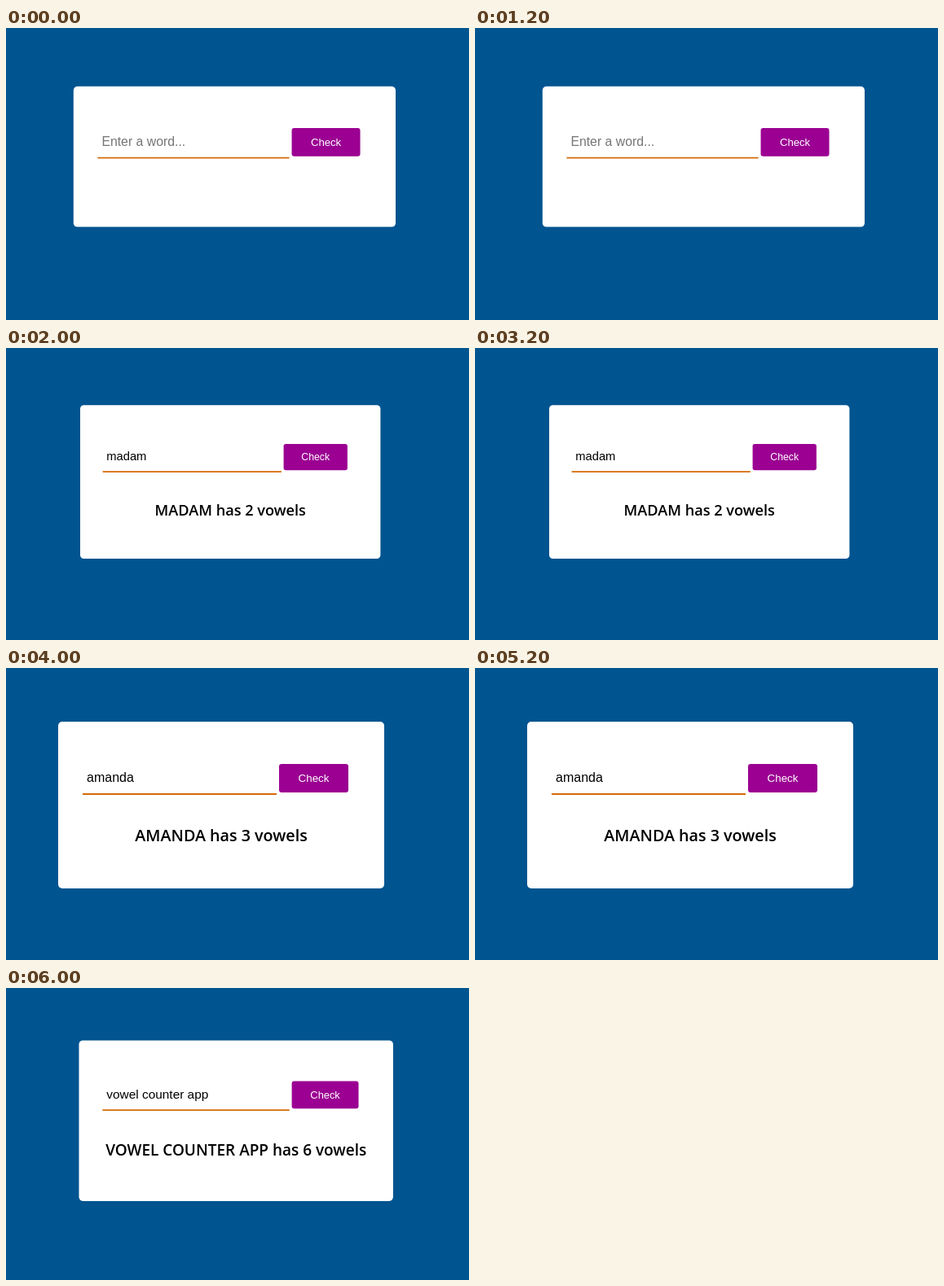
These frames come from a looping animation (568x359 px, 8000 ms). An HTML page with a canvas:

```html
<!DOCTYPE html>
<html lang="en">
<head>
<meta charset="utf-8">
<title>Vowel counter</title>
<style>
  html, body { margin: 0; width: 100%; height: 100%; overflow: hidden; background: #005490; }
  canvas { display: block; width: 568px; height: 359px; }
</style>
</head>
<body>
<canvas id="stage"></canvas>
<script>
const W = 568, H = 359, HOLD = 2000;
const SANS = '"Liberation Sans", Arial, sans-serif';
const OPEN = '"Open Sans", sans-serif';

// Card position and zoom for each step
const scenes = [
  { x: 82.8, y: 71.7, zoom: 0.988, height: 175, word: '' },
  { x: 91, y: 70.2, zoom: 0.921, height: 205, word: 'madam' },
  { x: 64, y: 66, zoom: 1, height: 205, word: 'amanda' },
  { x: 89.5, y: 64.4, zoom: 0.9635, height: 205, word: 'vowel counter app' }
];

const canvas = document.getElementById('stage');
const ctx = canvas.getContext('2d');
const dpr = window.devicePixelRatio || 1;
canvas.width = W * dpr;
canvas.height = H * dpr;

function widthOf(font, str) {
  ctx.font = font;
  return ctx.measureText(str).width;
}

// Use semibold where the medium weight is missing
const hasMedium = widthOf(`500 100px ${OPEN}`, 'vowels') !== widthOf(`400 100px ${OPEN}`, 'vowels');
const resultFont = `${hasMedium ? '500 20px' : '600 19.7px'} ${OPEN}`;

function box(x, y, w, h, r, color) {
  ctx.fillStyle = color;
  ctx.beginPath();
  ctx.roundRect(x, y, w, h, r);
  ctx.fill();
}

function label(str, x, y, font, color, align = 'left') {
  ctx.font = font;
  ctx.fillStyle = color;
  ctx.textAlign = align;
  ctx.fillText(str, x, y);
}

function draw({ x, y, zoom, height, word }) {
  ctx.setTransform(dpr, 0, 0, dpr, 0, 0);
  ctx.fillStyle = '#005490';
  ctx.fillRect(0, 0, W, H);

  ctx.translate(x, y);
  ctx.scale(zoom, zoom);
  box(0, 0, 400, height, 5, '#fff');
  box(30, 88, 238, 2, 0, '#d46a06');
  label(word || 'Enter a word...', 35, 74, `16px ${SANS}`, word ? '#000' : '#757575');
  box(271, 52, 85, 35, 3, '#9b0092');
  label('Check', 313.5, 74, `13.333px ${SANS}`, '#fff', 'center');

  if (word) {
    const count = word.match(/[aeiou]/g).length;
    label(`${word.toUpperCase()} has ${count} vowels`, 200, 147, resultFont, '#000', 'center');
  }
}

const start = performance.now();
function tick() {
  const t = performance.now() - start;
  draw(scenes[Math.floor(t / HOLD) % scenes.length]);
  requestAnimationFrame(tick);
}
tick();
</script>
</body>
</html>
```
